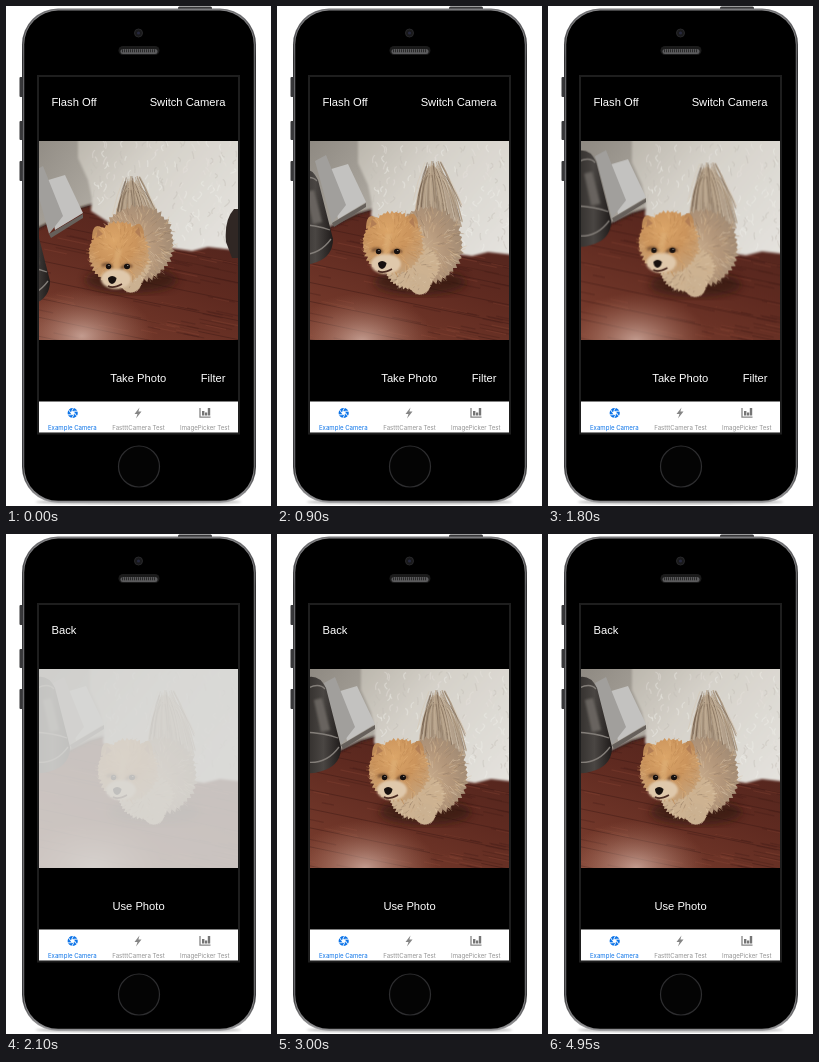
Animation of 265x500 px, one loop 5100 ms. Source, as an HTML page:

```html
<!DOCTYPE html>
<html lang="en">
<head>
<meta charset="utf-8">
<title>Camera demo</title>
<style>
html, body { margin: 0; width: 100%; height: 100%; overflow: hidden; background: #fff; }
svg { display: block; width: 265px; height: 500px; }
.ui text { font: 11.2px "Liberation Sans", Arial, sans-serif; fill: #fff; }
.tabs text { font: 6.1px Inter, "Liberation Sans", sans-serif; text-anchor: middle; fill: #929292; }
.tabs .on { fill: #0b73e8; }

/* Each part has four early poses, then settles at its drawn place. */
.part { animation: drift 5100ms infinite; }
@keyframes drift {
  0% { transform: translate(var(--a)); animation-timing-function: steps(2); }
  5.882% { transform: translate(var(--b)); animation-timing-function: steps(4); }
  17.647% { transform: translate(var(--c)); animation-timing-function: steps(3); }
  26.47% { transform: translate(var(--d)); animation-timing-function: steps(5); }
  41.176%, 100% { transform: translate(0px, 0px); }
}
.ground { --a: -12px,-4px; --b: -8px,0px; --c: -3px,1px; --d: 0px,1px; }
.paper { --a: -21px,17px; --b: -15px,13px; --c: -9px,6px; --d: 0px,3px; }
.bucket { --a: -20px,62px; --b: -13px,45px; --c: -8px,20px; --d: -2px,4px; }
.chair { --a: -14px,0px; --b: 0px,0px; --c: 0px,0px; --d: 0px,0px; }
.tail { --a: -34px,14px; --b: -12px,7px; --c: -4px,-1px; --d: -1px,1px; }
.body { --a: -23px,-4px; --b: -7px,3px; --c: -5px,-2px; --d: -2px,1px; }
.head { --a: -9px,11px; --b: 4px,4px; --c: -6px,1px; --d: -3px,1px; }
.face { --a: 4px,6px; --b: 2px,2px; --c: 0px,1px; --d: -1px,1px; }

.live { animation: live 5100ms step-end infinite; }
.review { animation: review 5100ms step-end infinite; }
.flash { animation: flash 5100ms step-end infinite; }
@keyframes live { 0% { opacity: 1; } 41.176%, 100% { opacity: 0; } }
@keyframes review { 0% { opacity: 0; } 41.176%, 100% { opacity: 1; } }
@keyframes flash {
  0% { opacity: 0; }
  41.176% { opacity: .87; }
  44.117% { opacity: .5; }
  47.058% { opacity: .2; }
  50%, 100% { opacity: 0; }
}
</style>
</head>
<body>
<svg viewBox="0 0 265 500">
  <defs>
    <linearGradient id="metal" x2="0" y2="1">
      <stop offset="0" stop-color="#77777a"/>
      <stop offset=".1" stop-color="#303032"/>
      <stop offset=".5" stop-color="#4b4b4e"/>
      <stop offset=".93" stop-color="#39393b"/>
      <stop offset="1" stop-color="#a4a4a6"/>
    </linearGradient>
    <linearGradient id="floor" x1=".7" x2=".3" y1=".2" y2="1">
      <stop offset="0" stop-color="#4a211b"/>
      <stop offset=".5" stop-color="#5f2a20"/>
      <stop offset="1" stop-color="#7a3d2e"/>
    </linearGradient>
    <radialGradient id="glare">
      <stop offset="0" stop-color="#dcbcb0" stop-opacity=".75"/>
      <stop offset="1" stop-color="#b07762" stop-opacity="0"/>
    </radialGradient>
    <linearGradient id="wall" x2="1" y2=".6">
      <stop offset="0" stop-color="#827d76"/>
      <stop offset="1" stop-color="#bbb6ad"/>
    </linearGradient>
    <linearGradient id="rug" x2="1" y2=".6">
      <stop offset="0" stop-color="#b8b3a9"/>
      <stop offset=".4" stop-color="#d5d1c9"/>
      <stop offset="1" stop-color="#e4e2dd"/>
    </linearGradient>
    <linearGradient id="tin">
      <stop offset="0" stop-color="#24211f"/>
      <stop offset=".6" stop-color="#4a4643"/>
      <stop offset="1" stop-color="#1f1b1a"/>
    </linearGradient>
    <radialGradient id="coat" cx=".42" cy=".3" r=".7">
      <stop offset="0" stop-color="#dca669"/>
      <stop offset=".5" stop-color="#cb945c"/>
      <stop offset="1" stop-color="#c4a17a"/>
    </radialGradient>
    <radialGradient id="flank" cx=".3" cy=".6" r=".75">
      <stop offset="0" stop-color="#d3b795"/>
      <stop offset=".6" stop-color="#b3967a"/>
      <stop offset="1" stop-color="#a08a74"/>
    </radialGradient>
    <filter id="soft"><feGaussianBlur stdDeviation="1.2"/></filter>
    <filter id="hazy"><feGaussianBlur stdDeviation="4"/></filter>
    <filter id="fluffy"><feGaussianBlur stdDeviation=".6"/></filter>
    <clipPath id="view"><rect x="33" y="135" width="199" height="198.5"/></clipPath>
  </defs>

  <!-- phone -->
  <ellipse cx="132.5" cy="496" rx="103" ry="2.5" fill="#bbb" filter="url(#soft)"/>
  <g fill="#38383a">
    <rect x="172" y="0.5" width="34" height="4" rx="1.5"/>
    <rect x="13.5" y="71" width="4" height="20" rx="1"/>
    <rect x="13.5" y="115" width="4" height="19" rx="1"/>
    <rect x="13.5" y="155" width="4" height="20" rx="1"/>
  </g>
  <rect x="16" y="2.5" width="234" height="494.5" rx="36" fill="url(#metal)"/>
  <rect x="17.4" y="3.8" width="231.2" height="492" rx="34.8" fill="#88888a"/>
  <rect x="18.2" y="4.6" width="229.6" height="490.2" rx="34"/>
  <circle cx="132.5" cy="27" r="4" fill="#19191b" stroke="#28282a"/>
  <circle cx="132.5" cy="27" r="1.6" fill="#26283d"/>
  <rect x="112.5" y="40" width="41" height="9" rx="4.5" fill="#1b1b1b"/>
  <rect x="114.5" y="43" width="37" height="5" rx="2.5" fill="#5a5a5c"/>
  <path d="M116 44.7H150" stroke="#2a2a2a" stroke-width="3" stroke-dasharray="1 1"/>
  <circle cx="133" cy="460.5" r="20.5" fill="#040404" stroke="#2e2e30" stroke-width="1.2"/>
  <rect x="32" y="70" width="201" height="357.5" stroke="#1e1e1e" stroke-width="2"/>

  <!-- picture -->
  <g clip-path="url(#view)">
    <g class="part ground">
      <path d="M0 120H270V350H0Z" fill="url(#floor)"/>
      <g id="planks" fill="none"></g>
      <ellipse cx="88" cy="334" rx="72" ry="48" fill="url(#glare)"/>
      <path d="M0 120H150L101 202L84 207L0 248Z" fill="url(#wall)"/>
      <path d="M0 248L84 207L101 202" fill="none" stroke="#39241f" stroke-width="2" filter="url(#soft)"/>
      <path d="M84 120H270V246L240 248L214 245L198 249L170 245L150 245L120 224L97 209L98 196L94 178L84 156Z"
        fill="url(#rug)" filter="url(#soft)"/>
      <g id="pile" filter="url(#fluffy)"></g>
    </g>
    <g class="part paper">
      <path d="M60 158L80 152L98 190L70 207Z" fill="#c3c2c0"/>
      <path d="M47 149L58 143L78 193L64 211Z" fill="#a19f9c"/>
      <path d="M64 211L98 191L98 195L66 215Z" fill="#66605b"/>
    </g>
    <g class="part bucket">
      <path d="M20 148Q40 135 49 154L64 213Q64 230 48 236Q35 241 20 239Z" fill="url(#tin)"/>
      <path d="M22 160Q40 146 48 155M26 198Q48 199 61 204M28 228Q49 231 62 213" fill="none" stroke="#827d78" stroke-width="1.3"/>
      <path d="M37 166L45 164L53 196L44 198Z" fill="#68635e" filter="url(#soft)"/>
    </g>
    <path class="part chair" d="M242 203Q232 214 234 236L240 252H260V203Z" fill="#302724"/>

    <ellipse class="part body" cx="148" cy="278" rx="46" ry="13" fill="#2b130f" opacity=".6" filter="url(#hazy)"/>
    <g class="part tail" id="tail" filter="url(#fluffy)"></g>
    <g class="part body" id="body" filter="url(#fluffy)"></g>
    <g class="part head">
      <g filter="url(#fluffy)">
        <path d="M95 222Q95 209 101 209Q108 211 112 218ZM134 214Q139 205 143 207Q148 212 147 224Z" fill="#bd8a58"/>
        <g id="head"></g>
        <path d="M99 221L101 212L106 217ZM138 215L142 210L144 221Z" fill="#a87450" opacity=".7"/>
      </g>
      <g class="part face">
        <g filter="url(#soft)">
          <ellipse cx="115" cy="256" rx="15" ry="10" fill="#dfc8ab"/>
          <path d="M101 243Q107 238 112 245M120 246Q125 239 131 244" fill="none" stroke="#7c5436" stroke-width="3"/>
          <path d="M118 226L114 247" stroke="#e2b57e" stroke-width="6" opacity=".5"/>
        </g>
        <g fill="#17100e">
          <ellipse cx="107.5" cy="243.5" rx="2.7" ry="2.7"/>
          <ellipse cx="126" cy="243.5" rx="3" ry="2.8"/>
          <path d="M107 255Q111 251 115.5 255Q115 260 111 261Q107 260 107 255Z"/>
        </g>
        <path d="M107 263Q112 266 121 261" fill="none" stroke="#4b2b22" stroke-width="1.6" filter="url(#fluffy)"/>
        <g fill="#cfc6bd"><circle cx="108" cy="242.5" r=".6"/><circle cx="126.8" cy="242.5" r=".6"/></g>
      </g>
    </g>
    <rect class="flash" x="33" y="135" width="199" height="199" fill="#dad9d7"/>
  </g>

  <!-- controls -->
  <g class="ui live">
    <text x="45.5" y="100">Flash Off</text>
    <text x="219.5" y="100" text-anchor="end">Switch Camera</text>
    <text x="132.3" y="376" text-anchor="middle">Take Photo</text>
    <text x="219.5" y="376" text-anchor="end">Filter</text>
  </g>
  <g class="ui review">
    <text x="45.5" y="100">Back</text>
    <text x="132.5" y="376" text-anchor="middle">Use Photo</text>
  </g>

  <g class="tabs">
    <rect x="33" y="395.5" width="199" height="31" fill="#fff"/>
    <circle cx="66.7" cy="407" r="3.6" fill="none" stroke="#0b73e8" stroke-width="3"/>
    <g id="blades" stroke="#fff" stroke-width=".9"></g>
    <path d="M133.5 401.5L128.5 408H131.5L130 412.5L135.5 405.5H132.4Z" fill="#858585"/>
    <path d="M194 402V411.2H204.5" fill="none" stroke="#858585" stroke-width="1.3"/>
    <path d="M196 405H198.4V409.5H196ZM199 406.5H201.2V409.5H199ZM201.8 402H204.2V409.5H201.8Z" fill="#757575"/>
    <text class="on" x="66.3" y="424">Example Camera</text>
    <text x="132.5" y="424">FastttCamera Test</text>
    <text x="198.8" y="424">ImagePicker Test</text>
  </g>
</svg>
<script>
let seed = 7;
const rand = () => (seed = seed * 16807 % 2147483647) / 2147483647;
const between = (a, b) => a + rand() * (b - a);
const pick = list => list[Math.floor(rand() * list.length)];

function add(id, d, style) {
  const path = document.createElementNS("http://www.w3.org/2000/svg", "path");
  path.setAttribute("d", d);
  for (const key in style) path.setAttribute(key, style[key]);
  document.getElementById(id).append(path);
}

// A ragged oval with short hairs growing outwards.
function fur(id, cx, cy, rx, ry, fill, hairs, count) {
  const at = (a, r) => `${(cx + Math.cos(a) * rx * r).toFixed(1)} ${(cy + Math.sin(a) * ry * r).toFixed(1)}`;
  const edge = [];
  for (let i = 0; i < 90; i++) {
    edge.push(at(i / 90 * 2 * Math.PI, i % 2 ? between(.96, 1.04) : between(.9, .95)));
  }
  add(id, `M${edge.join("L")}Z`, { fill });
  for (let i = 0; i < count; i++) {
    const a = between(0, 2 * Math.PI), r = Math.sqrt(rand()) * .9;
    add(id, `M${at(a, r)}L${at(a + between(-.12, .12), r + .18)}`,
      { stroke: pick(hairs), "stroke-width": between(.4, 1).toFixed(1), opacity: .5 });
  }
}

// Floorboards with a fine grain.
for (let i = 0; i < 9; i++) {
  const y = 210 + i * 19;
  add("planks", `M0 ${y - 18}L270 ${y + 38}`, { stroke: "#3c1914", "stroke-width": 1, opacity: .45 });
}
for (let i = 0; i < 110; i++) {
  const x = between(20, 230), y = between(205, 335), length = between(12, 35);
  add("planks", `M${x} ${y}l${length} ${length * .21}`,
    { stroke: pick(["#8d4a37", "#3f1b16"]), "stroke-width": 1.2, opacity: .3 });
}

for (let i = 0; i < 190; i++) {
  const x = between(96, 245), y = between(137, 240);
  if (y > 200 && x < 150) continue;
  add("pile", `M${x} ${y}q${between(-5, 5)} 2 ${between(-4, 4)} ${between(4, 8)}`,
    { fill: "none", stroke: pick(["#f1efeb", "#c1bcb4", "#e5e2dc"]), "stroke-width": 1.3, opacity: .4 });
}

const cream = ["#e5d1b4", "#c6a47d", "#8f7660", "#d8bc96"];
const ginger = ["#e4b47a", "#b9834e", "#d5a066"];

// The plume fans down from its tip.
add("tail", "M141 214Q145 172 159 160Q176 168 189 222Z", { fill: "#b3a08b" });
for (let i = 0; i < 110; i++) {
  const spread = between(-1, 1), end = between(190, 222);
  add("tail", `M${160 + spread * 8} ${between(156, 174)}Q${162 + spread * 18} 176 ${165 + spread * 25} ${end}`,
    { fill: "none", stroke: pick(["#76624f", "#d6c7b2", "#a18c76", "#c2ad94"]), "stroke-width": 1, opacity: .55 });
}
fur("body", 155, 241, 37, 39, "url(#flank)", cream, 210);
fur("body", 140, 262, 28, 24, "#cdb291", cream, 110);
fur("body", 148, 280, 11, 11, "#cbb191", cream, 25);
fur("head", 122, 236, 31, 32, "url(#coat)", ginger, 170);

for (let i = 0; i < 6; i++) {
  const point = (a, r) => `${66.7 + Math.cos(a) * r} ${407 + Math.sin(a) * r}`;
  const a = i * Math.PI / 3;
  add("blades", `M${point(a, 2)}L${point(a + .7, 5.5)}`, {});
}
</script>
</body>
</html>
```
